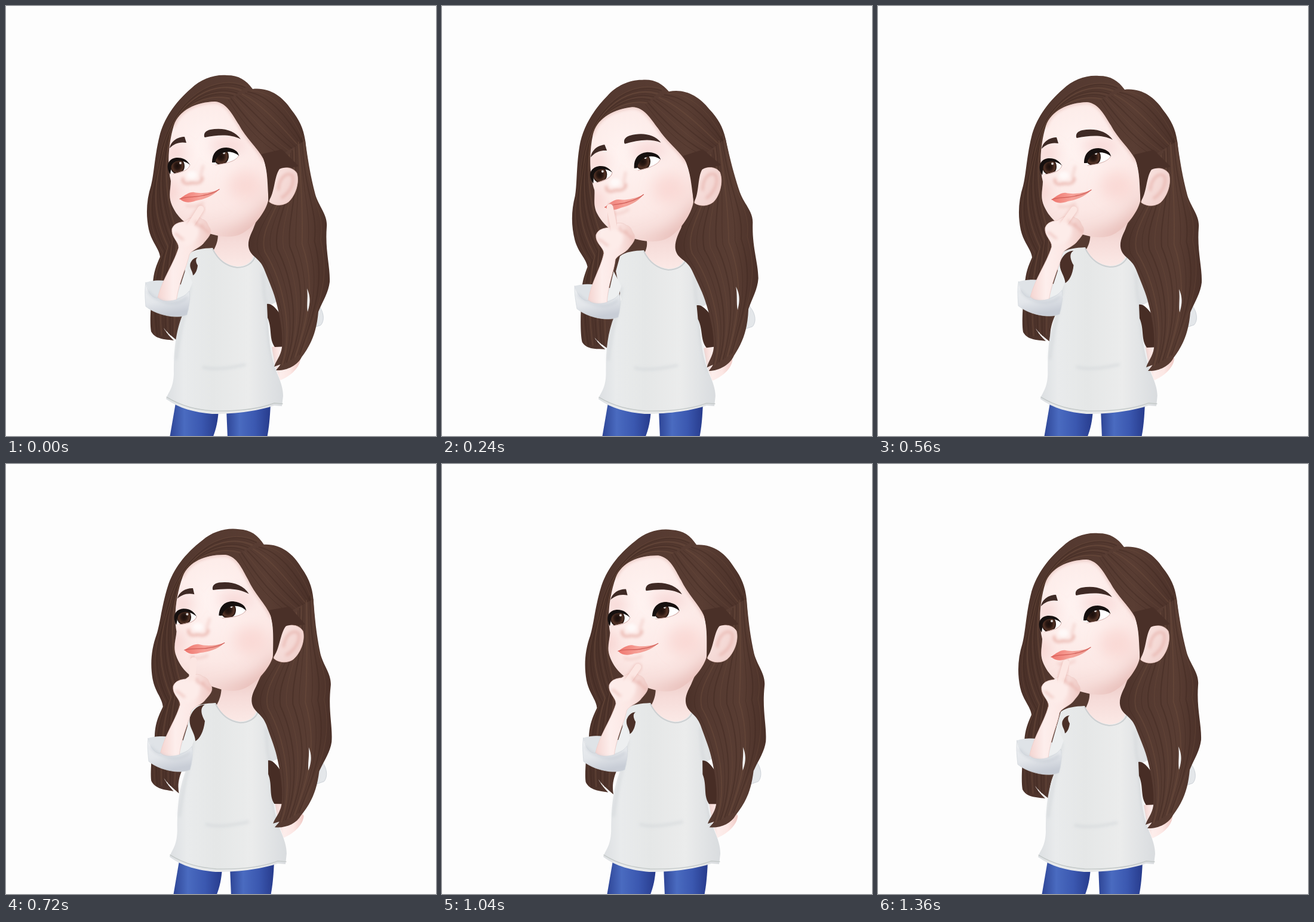
Write an HTML page that moves like this. It is 720x720 px and loops after 1440 ms.

```html
<!DOCTYPE html>
<html lang="en">
<head>
<meta charset="utf-8">
<title>Thinking</title>
<style>
  html, body { margin: 0; width: 100%; height: 100%; overflow: hidden; background: #fdfdfd; }
  svg { display: block; width: 100vw; height: 100vh; }
  path { stroke-linecap: round; stroke-linejoin: round; }
  .line { fill: none; }
  .soft { filter: url(#blur); }
  .softer { filter: url(#blur2); }
</style>
</head>
<body>
<svg viewBox="0 0 720 720">
  <defs>
    <filter id="blur" x="-50%" y="-50%" width="200%" height="200%"><feGaussianBlur stdDeviation="2.5"/></filter>
    <filter id="blur2" x="-60%" y="-60%" width="220%" height="220%"><feGaussianBlur stdDeviation="11"/></filter>
    <radialGradient id="skin" gradientUnits="userSpaceOnUse" cx="335" cy="235" r="175">
      <stop stop-color="#fff4f2"/><stop offset=".6" stop-color="#fce8e5"/><stop offset="1" stop-color="#f0d0cc"/>
    </radialGradient>
    <linearGradient id="neck" x2="0" y2="1">
      <stop stop-color="#ecc9c5"/><stop offset=".45" stop-color="#f6dcd9"/><stop offset="1" stop-color="#fcebe8"/>
    </linearGradient>
    <linearGradient id="arm">
      <stop stop-color="#f4d3cf"/><stop offset=".3" stop-color="#fdeeec"/><stop offset=".65" stop-color="#fce7e4"/><stop offset="1" stop-color="#efc9c4"/>
    </linearGradient>
    <linearGradient id="shirt">
      <stop stop-color="#dcdfe2"/><stop offset=".15" stop-color="#e9ebec"/><stop offset=".4" stop-color="#e5e7e7"/>
      <stop offset=".7" stop-color="#ebecec"/><stop offset="1" stop-color="#d9dcdf"/>
    </linearGradient>
    <linearGradient id="cuff" x2=".25" y2="1">
      <stop stop-color="#eff1f3"/><stop offset=".6" stop-color="#e3e6ea"/><stop offset="1" stop-color="#c8cdd6"/>
    </linearGradient>
    <linearGradient id="jeans">
      <stop stop-color="#2e4596"/><stop offset=".3" stop-color="#4a6bc0"/><stop offset=".65" stop-color="#3b58b0"/><stop offset="1" stop-color="#273b8c"/>
    </linearGradient>
    <linearGradient id="hair">
      <stop stop-color="#4b3129"/><stop offset=".25" stop-color="#543930"/><stop offset=".7" stop-color="#593d33"/><stop offset="1" stop-color="#4a3028"/>
    </linearGradient>
    <linearGradient id="lips"><stop stop-color="#ee756d"/><stop offset=".5" stop-color="#f7a198"/><stop offset="1" stop-color="#e99a91"/></linearGradient>
    <radialGradient id="iris"><stop stop-color="#1a0f0c"/><stop offset=".4" stop-color="#2a1812"/><stop offset=".75" stop-color="#543427"/><stop offset="1" stop-color="#21130f"/></radialGradient>
    <clipPath id="rightEye"><path d="M347,258 C349,242 376,233 390,250 C387,259 368,264 351,266 Z"/></clipPath>
    <clipPath id="leftEye"><path d="M272,276 C272,257 295,252 308,266 C307,274 292,278 280,281 Z"/></clipPath>
    <clipPath id="faceClip"><use href="#face"/></clipPath>
  </defs>

  <g data-warp="body">
    <path fill="#e4e7ea" stroke="#cdd2d8" d="M500,470 L512,470 L524,502 C532,512 534,526 527,534 L512,539 L500,520 Z"/>
    <path fill="url(#arm)" d="M445,571 C460,562 480,572 493,590 C492,604 478,618 459,626 L450,600 Z"/>
  </g>
  <path data-warp="hair" fill="url(#hair)" d="M370,116 C350,114 326,122 310,138 C282,162 264,190 257,218 C249,250 248,280 243,300 C235,325 234,350 239,374 C244,396 256,405 258,420 C250,438 246,450 246,470 C243,490 240,530 243,545 C250,558 264,558 281,560 C274,553 268,547 264,539 C272,549 280,555 290,563 C286,546 290,530 300,510 L320,430 L420,430 L512,300 C509,280 504,255 501,225 C498,205 491,190 478,174 C462,150 440,136 413,139 C402,124 390,116 370,116 Z"/>
  <g id="strandsLeft" data-warp="hair"></g>

  <g data-warp="body">
    <path fill="url(#jeans)" d="M284,664 L356,674 C355,695 351,710 346,722 L274,722 Z"/>
    <path fill="url(#jeans)" d="M369,674 L443,664 C442,690 440,708 437,722 L371,722 Z"/>
    <path fill="url(#neck)" d="M352,365 C358,385 354,398 347,410 L356,432 L390,442 L417,428 L416,416 C404,412 406,390 420,358 Z"/>
    <path fill="url(#shirt)" d="M346,405 C355,425 370,434 387,436 C400,436 412,430 415,416 L427,424 C438,445 449,470 453,495 L438,503 C438,545 442,585 453,612 C460,628 464,640 464,652 L462,669 L449,668 C425,676 390,682 345,682 C315,679 290,673 268,657 C272,645 280,640 281,615 C281,575 284,545 296,516 L308,488 L299,440 L306,415 C316,407 330,406 346,405 Z"/>
    <path class="line" stroke="#cdd0d2" stroke-width="2" d="M346,407 C356,427 370,436 387,438 C401,438 414,431 417,419"/>
    <path class="line" stroke="#c4c9c8" stroke-width="1.4" d="M269,654 C295,670 320,675 346,677 C390,678 425,673 449,664 L463,665"/>
    <g class="line soft" stroke="#cfd3d7" stroke-width="4" opacity=".6">
      <path d="M430,448 C433,475 431,490 438,503 C438,545 443,585 452,610"/>
      <path d="M308,468 C304,505 289,545 285,590"/>
      <path d="M330,604 C350,610 380,604 400,600"/>
    </g>
  </g>
  <path id="lock" fill="#4b3028" data-warp="body" d="M328,408 C319,413 322,425 328,435 C326,453 319,464 312,468 C311,452 300,446 303,429 C308,415 318,408 328,408 Z"/>

  <path data-warp="hair" fill="#472d25" d="M437,499 C446,497 456,510 468,530 L474,570 L450,571 C440,557 446,540 438,522 Z"/>
  <path data-warp="hair" fill="url(#hair)" d="M442,326 C430,352 404,380 406,402 C408,420 424,420 432,440 C441,463 449,480 453,498 C460,525 464,550 462,572 C460,586 452,594 449,604 L460,600 L452,610 C470,611 488,602 495,588 C512,565 520,545 523,512 C530,495 540,480 542,462 C543,435 534,410 537,370 C539,350 524,336 518,316 C510,285 506,262 501,225 L460,250 Z"/>
  <g id="strandsRight" data-warp="hair"></g>
  <path data-warp="hair" fill="#f3f4f5" d="M504,473 C507,480 512,491 505,512 C503,500 506,488 504,473 Z"/>

  <g id="head">
    <path fill="url(#skin)" stroke="#edc9c3" stroke-width=".8" d="M448,276 C460,268 480,268 487,280 C492,296 484,318 473,328 C462,336 448,334 441,328 Z"/>
    <path class="line soft" stroke="#e9b9b3" stroke-width="4" d="M456,307 C458,285 472,277 480,284 C484,298 474,313 462,321"/>
    <path id="face" fill="url(#skin)" d="M281,200 C290,174 318,161 350,160 C370,162 379,182 390,199 C402,222 422,238 432,258 C439,280 440,300 439,326 C434,346 414,371 395,381 C375,392 345,384 325,375 C300,367 286,352 278,334 C271,319 276,306 276,293 C270,270 271,233 281,200 Z"/>
    <g clip-path="url(#faceClip)">
      <g class="softer">
        <ellipse cx="400" cy="300" rx="28" ry="24" fill="#f5bdb8" opacity=".35"/>
        <ellipse cx="276" cy="310" rx="12" ry="18" fill="#f0b0aa" opacity=".45"/>
        <path fill="#e3b2ac" opacity=".6" d="M330,384 C380,382 415,362 445,318 L450,400 Z"/>
        <ellipse cx="370" cy="234" rx="30" ry="10" fill="#efb9b8" opacity=".55"/>
        <ellipse cx="284" cy="246" rx="16" ry="11" fill="#efb9b8" opacity=".6"/>
      </g>
      <path class="line soft" stroke="#dba9a1" stroke-width="4" opacity=".6" d="M281,200 C290,174 318,161 350,160 C370,162 379,182 390,199 C402,222 422,238 432,258"/>
      <g class="line soft" stroke="#e3a49b" stroke-width="4">
        <path opacity=".75" d="M296,289 C295,300 306,298 312,296 C320,298 328,296 329,288"/>
        <path opacity=".35" d="M330,268 C328,278 325,281 327,288"/>
        <path opacity=".35" d="M302,334 C310,337 320,335 330,330"/>
      </g>
      <ellipse class="soft" cx="311" cy="283" rx="9" ry="7" fill="#fff" opacity=".65"/>
    </g>
    <path fill="url(#lips)" d="M291,323 C300,316 308,311 315,312 C324,314 340,314 357,307 C346,319 330,324 318,326 C307,330 298,330 291,323 Z"/>
    <path class="line" stroke="#d2605a" stroke-width="1.3" d="M291,323 C304,318 318,321 331,317 C342,315 350,312 357,307"/>

    <g clip-path="url(#rightEye)">
      <path fill="#fff" d="M340,230 H395 V270 H340 Z"/>
      <ellipse cx="360" cy="252" rx="13" ry="14" fill="url(#iris)"/>
      <circle cx="365" cy="246" r="2" fill="#fff" opacity=".8"/>
    </g>
    <path class="line" stroke="#d4b0ac" d="M351,266 C368,264 386,260 390,250"/>
    <path fill="#16100f" d="M345,262 C345,244 356,237 369,237 C381,238 389,243 390,251 C378,240 355,242 350,262 Z"/>
    <g clip-path="url(#leftEye)">
      <path fill="#fff" d="M268,250 H312 V285 H268 Z"/>
      <ellipse cx="287" cy="268" rx="12" ry="13.500" fill="url(#iris)"/>
      <circle cx="292" cy="263" r="2" fill="#fff" opacity=".8"/>
    </g>
    <path class="line" stroke="#d4b0ac" d="M280,281 C294,279 306,275 308,266"/>
    <path fill="#16100f" d="M275,282 C267,270 270,256 285,254 C297,253 304,259 308,266 C296,256 275,256 276,275 Z"/>
    <path fill="#3f2a25" d="M332,219 C331,213 334,209 342,207 C363,203 383,208 393,223 C375,214 354,216 333,220 Z"/>
    <path fill="#3f2a25" d="M274,238 C276,226 288,219 299,219 L302,229 C290,227 281,231 274,238 Z"/>
    <path fill="#4a3028" d="M428,248 C440,275 437,300 440,326 C450,313 449,285 458,273 C468,268 481,272 490,268 L462,240 Z"/>
  </g>

  <g data-warp="arm">
    <path fill="#dfe3e7" d="M234,463 C248,458 280,456 306,474 L306,510 L250,512 Z"/>
    <path fill="#edeff0" d="M302,437 L312,463 L305,482 L285,490 Z"/>
    <path fill="url(#arm)" stroke="#efcfca" stroke-width=".8" d="M252,500 C256,465 280,435 289,405 C290,395 276,387 278,373 C282,363 292,362 299,361 C309,352 322,351 328,357 C338,359 337,367 341,371 C347,381 336,390 330,398 C322,406 312,408 307,416 C302,440 287,465 284,504 Z"/>
  </g>
  <path id="fingerEdge" class="line soft" stroke="#e5aea7" stroke-width="13" opacity=".6"/>
  <path id="finger" class="line" stroke="#fce6e2" stroke-width="11"/>
  <g data-warp="arm">
    <path class="soft" fill="#fdece9" d="M286,372 C300,360 316,362 322,372 C325,388 312,400 300,402 C294,394 286,386 286,372 Z"/>
    <g class="line soft" stroke="#e2a49c" stroke-width="2.500" opacity=".7">
      <path d="M318,360 C316,370 326,366 329,371"/>
      <path d="M328,366 C329,375 336,374 339,380"/>
      <path d="M283,381 C291,384 292,390 297,391"/>
    </g>
    <path fill="url(#cuff)" stroke="#d3d8de" stroke-width=".8" d="M234,463 C237,481 246,490 255,489 C262,498 292,496 307,477 C309,490 306,505 303,517 C288,524 254,519 234,503 C233,490 232,475 234,463 Z"/>
    <path class="line soft" stroke="#bac1cb" stroke-width="2.500" opacity=".7" d="M238,478 C248,493 282,507 303,488"/>
  </g>
</svg>
<script>
const STEP = 80, STEPS = 18;
// step, head x/y, head turn, chest x/y, hip x, hand x/y, fingertip x/y, lock size
const keys = [
  [0, 0, 0, 0, 0, 0, 0, 0, 0, 326, 337, .5],
  [1, -14, -5, -.05, -4, 1, -4, -10, 4, 303, 333, .3],
  [2, -27, -2, -.095, -8, 4, -8, -24, 10, 276, 333, 0],
  [3, -20, 0, -.08, -8, 4, -6, -20, 10, 281, 334, 0],
  [5, -13, 1, -.045, -4, 4, 1, -10, 5, 310, 337, .4],
  [7, 0, 1, 0, 1, -1, 4, 2, -2, 328, 338, .9],
  [9, 9, -1, .06, 5, -5, 6, 2, -1, 314, 326, 1],
  [13, 5, -1, .05, 3, -5, 2, 2, -3, 328, 337, .6],
  [17, -1, 0, 0, 0, 0, 0, -4, 0, 315, 330, .5],
  [18, 0, 0, 0, 0, 0, 0, 0, 0, 326, 337, .5]
];
const byId = id => document.getElementById(id);
const clamp = v => Math.max(0, Math.min(1, v));
const mix = (a, b, u) => a + (b - a) * u;
const EAR = { x: 466, y: 302 };

// Fills the space between two curves with alternating dark and light strands.
function addStrands(group, from, to, count) {
  const a = from.match(/\d+/g), b = to.match(/\d+/g);
  for (let i = 0; i < count; i++) {
    let k = 0;
    const d = from.replace(/\d+/g, () => mix(+a[k], +b[k++], (i + .5) / count).toFixed(1));
    const tone = i % 3 ? "#3d261f" : "#71503f";
    byId(group).insertAdjacentHTML("beforeend",
      `<path class="line" stroke="${tone}" stroke-width="${1 + i % 2}" opacity=".4" d="${d}"/>`);
  }
}
addStrands("strandsLeft", "M405,133 C340,105 262,170 252,280 C232,345 240,380 262,415 C244,450 240,500 248,552",
  "M372,156 C345,150 300,158 279,200 C264,260 268,320 288,380 C285,430 285,500 284,550", 10);
addStrands("strandsLeft", "M412,141 C445,138 480,170 498,222", "M370,158 C395,200 425,243 488,266", 9);
addStrands("strandsRight", "M499,215 C505,320 542,340 532,390 C548,460 525,500 497,580",
  "M470,255 C475,320 400,370 418,415 C450,460 475,550 457,604", 11);

const paths = [...document.querySelectorAll("path[data-warp], [data-warp] path")].map(el =>
  ({ el, d: el.getAttribute("d"), warp: el.closest("[data-warp]").dataset.warp }));

function poseAt(step) {
  const i = keys.findIndex(k => k[0] > step), a = keys[i - 1], b = keys[i];
  const u = (step - a[0]) / (b[0] - a[0]);
  const [, headX, headY, turn, chestX, chestY, hipX, handX, handY, tipX, tipY, lock] = a.map((v, j) => mix(v, b[j], u));
  return { headX, headY, turn, chestX, chestY, hipX, handX, handY, tipX, tipY, lock };
}

const warps = {
  hair(x, y, p) {
    const below = y > EAR.y ? .6 : 1;
    return [x + p.headX - p.turn * (y - EAR.y) * below, y + p.headY + p.turn * (x - EAR.x)];
  },
  body(x, y, p) {
    const low = clamp((y - 430) / 240), high = clamp((405 - y) / 40);
    const [hx, hy] = warps.hair(x, y, p);
    return [mix(x + mix(p.chestX, p.hipX, low), hx, high), mix(y + mix(p.chestY, 1, low), hy, high)];
  },
  arm(x, y, p) {
    const up = clamp((500 - y) / 115);
    return [x + mix(p.chestX, p.handX, up), y + mix(p.chestY, p.handY, up)];
  }
};

function draw(p) {
  for (const { el, d, warp } of paths)
    el.setAttribute("d", d.replace(/([\d.]+),([\d.]+)/g, (_, x, y) =>
      warps[warp](+x, +y, p).map(v => v.toFixed(2)).join()));
  const { turn: s } = p;
  byId("head").setAttribute("transform",
    `matrix(1 ${s} ${-s} 1 ${p.headX + s * EAR.y} ${p.headY - s * EAR.x})`);
  byId("lock").setAttribute("transform", `translate(314 434) scale(${p.lock}) translate(-314 -434)`);
  const finger = `M${309 + p.handX},${367 + p.handY} L${p.tipX},${p.tipY + 3}`;
  byId("finger").setAttribute("d", finger);
  byId("fingerEdge").setAttribute("d", finger);
}

let shown = -1;
function tick() {
  const step = Math.floor(performance.now() / STEP) % STEPS;
  if (step !== shown) draw(poseAt(shown = step));
  requestAnimationFrame(tick);
}
tick();
</script>
</body>
</html>
```
